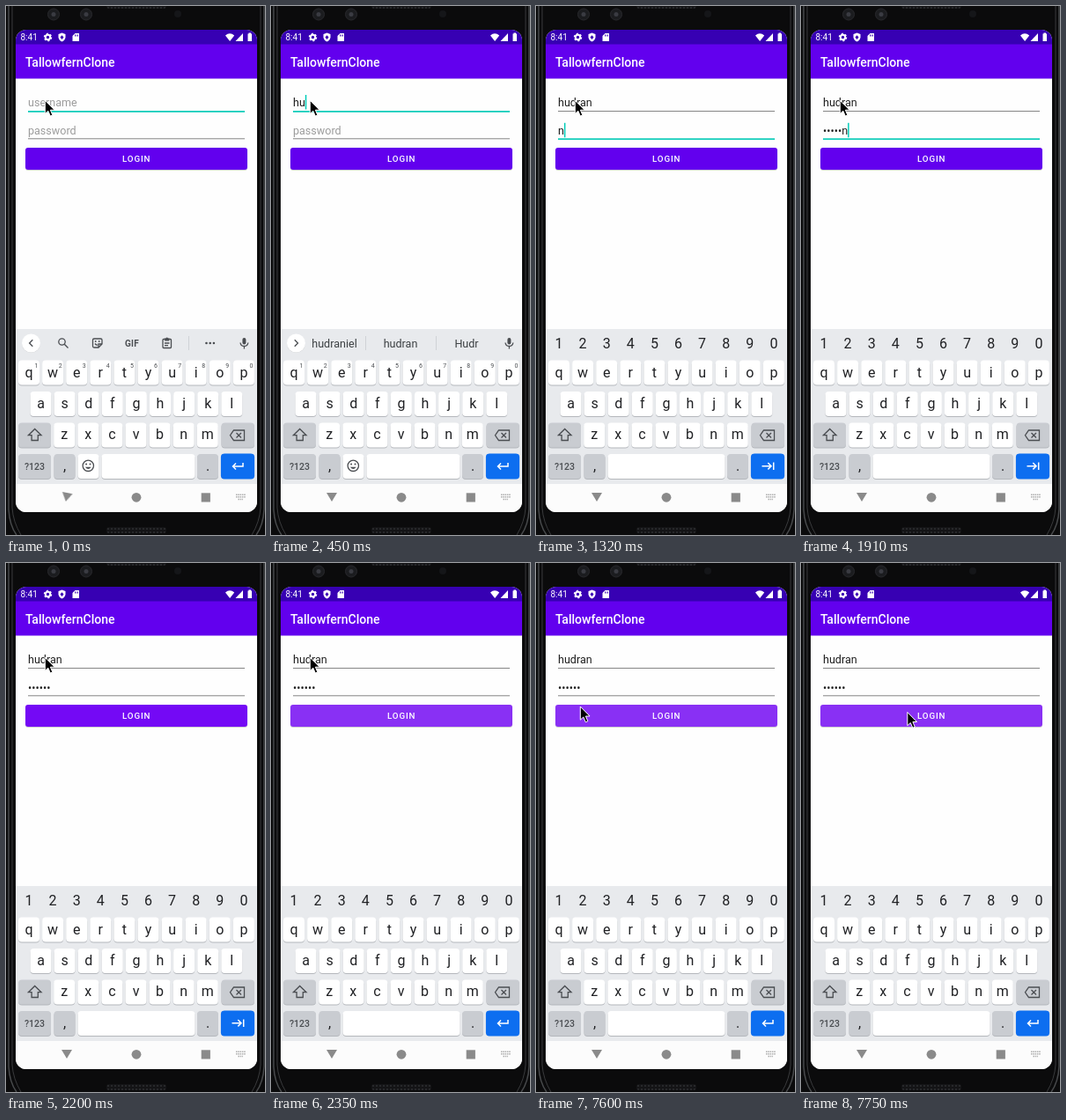
An HTML page that plays this animation: 294x601 px, repeating every 8 s.

```html
<!DOCTYPE html>
<html lang="en">
<head>
<meta charset="utf-8">
<title>Login screen</title>
<style>
html, body { margin: 0; width: 100%; height: 100%; overflow: hidden; background: #0b0b0c; }
svg { display: block; width: 294px; height: 601px; font-family: Roboto, Arial, sans-serif; }
text { white-space: pre; }
.field { font-size: 12.56px; }
.key { font-size: 16px; fill: #202124; text-anchor: middle; }
.hint { font-size: 7px; fill: #4a4d51; text-anchor: middle; }
.word { font-size: 12.56px; fill: #3c4043; text-anchor: middle; }
.mode { font-size: 10.5px; font-weight: 500; fill: #4a4d51; text-anchor: middle; }
.line { fill: none; stroke: #4a4d51; stroke-width: 1.3; }
.dark { fill: #4a4d51; }
.off { display: none; }
#back { transform-origin: 69px 557px; animation: settle 8s step-end infinite; }
@keyframes settle { 0% { transform: rotate(11deg); } 1.875%, 100% { transform: none; } }
</style>
</head>
<body>
<svg viewBox="0 0 294 601">
  <defs>
    <clipPath id="screen"><rect x="11" y="27" width="274" height="548" rx="12"/></clipPath>
    <pattern id="grill" x="114" y="592" width="4" height="4" patternUnits="userSpaceOnUse">
      <rect width="4" height="4" fill="#141416"/><circle cx="2" cy="2" r="1.1" fill="#2b2c2f"/>
    </pattern>
  </defs>

  <!-- phone body -->
  <rect width="294" height="601" fill="#0b0b0c"/>
  <g fill="none">
    <path d="M3 0V572Q4 590 12 601M293 0V572Q292 590 284 601" stroke="#47494b" stroke-width="1.500"/>
    <path d="M7 0V570Q8 586 17 601M289 0V570Q288 586 279 601" stroke="#3a3b3d"/>
  </g>
  <g fill="#1b1c1f" stroke="#29292d">
    <circle cx="54" cy="9.500" r="6.500"/><circle cx="91" cy="9.500" r="6.500"/>
  </g>
  <g fill="#3a3b42"><circle cx="54" cy="9.500" r="2.500"/><circle cx="91" cy="9.500" r="2.500"/></g>
  <circle cx="195" cy="9" r="4" fill="#151619"/>
  <rect x="114" y="-4" width="68" height="7" rx="3" fill="url(#grill)"/>
  <rect x="114" y="592" width="68" height="7" rx="3" fill="url(#grill)"/>

  <g clip-path="url(#screen)">
    <rect x="11" y="27" width="274" height="548" fill="#fefefe"/>
    <rect x="11" y="43" width="274" height="39.500" fill="#6200ee"/>
    <rect x="11" y="27" width="274" height="16.500" fill="#3700b3"/>

    <!-- status bar -->
    <g fill="#fff">
      <text x="16.500" y="39" font-size="10">8:41</text>
      <circle cx="47.500" cy="35.500" r="2.700" fill="none" stroke="#fff" stroke-width="2"/>
      <circle cx="47.500" cy="35.500" r="4" fill="none" stroke="#fff" stroke-width="1.500" stroke-dasharray="2.100 2.090"/>
      <path d="M63.500 30.500L67.500 32V35.500Q67 39 63.500 40.500Q60 39 59.500 35.500V32Z"/>
      <path d="M63.500 33.200L65.500 35.500L63.500 38L61.500 35.500Z" fill="#3700b3"/>
      <path d="M78.500 31H83V40H75.500V34Z"/>
      <path d="M78.500 32.500V34.500M80 32.500V34.500M81.500 32.500V34.500" stroke="#3700b3" stroke-width=".8"/>
      <path d="M249 33.500Q254 29.200 259.200 33.500L254.100 40Z"/>
      <path d="M269 31V40H260.500Z"/>
      <path d="M274.500 31.500H275.500V30.500H278V31.500H279V40H274.500Z"/>
    </g>
    <text x="22" y="69" font-size="14" font-weight="500" fill="#fff">TallowfernClone</text>

    <!-- form -->
    <text id="user" class="field" x="25" y="114.300"/>
    <rect id="userLine" x="25" width="246"/>
    <text id="pass" class="field" x="25" y="145.500"/>
    <rect id="passLine" x="25" width="246"/>
    <rect id="caret" width="1.500" height="16.500" fill="#03cdb9"/>
    <rect x="22" y="162" width="252" height="25" rx="3" fill="#000" opacity=".18"/>
    <rect id="button" x="22" y="161" width="252" height="25" rx="3"/>
    <text x="132" y="177.200" font-size="9.770" font-weight="500" letter-spacing=".87" fill="#fff">LOGIN</text>

    <!-- keyboard -->
    <rect x="11" y="367" width="274" height="176" fill="#e8eaed"/>
    <g id="strip">
      <circle cx="28.500" cy="383.500" r="10.500" fill="#000" opacity=".1"/>
      <circle cx="28.500" cy="383" r="10.500" fill="#fff"/>
      <path id="chevron" class="line"/>
      <rect x="268.400" y="377" width="4" height="7.500" rx="2" class="dark"/>
      <path class="line" d="M266 382.500Q266.500 386.500 270.400 386.500Q274.300 386.500 274.800 382.500M270.400 386.500V389.500"/>
    </g>
    <g id="tools">
      <circle class="line" cx="63.500" cy="381.500" r="3.700"/>
      <path class="line" d="M66.300 384.300L70.500 388.500"/>
      <path class="line" d="M100 378H107.500Q109 378 109 379.500V384L105 388H100Q98.500 388 98.500 386.500V379.500Q98.500 378 100 378ZM105 388V384H109M101 383.500Q102.500 385.500 104 385"/>
      <circle class="dark" cx="101.700" cy="381" r=".9"/><circle class="dark" cx="105.700" cy="381" r=".9"/>
      <text x="143" y="386.500" font-size="10" font-weight="700" letter-spacing=".3" text-anchor="middle" class="dark">GIF</text>
      <rect class="line" x="178" y="378.500" width="9.500" height="10" rx="1"/>
      <path class="dark" d="M180.200 377.500H181.500Q182.700 375.500 184 377.500H185.300V380.500H180.200Z"/>
      <path class="line" d="M180 383H185.500M180 385.700H184" stroke-width="1"/>
      <rect x="207" y="375" width="1" height="16" fill="#cfd2d6"/>
      <g class="dark"><circle cx="227.500" cy="383" r="1.300"/><circle cx="231.700" cy="383" r="1.300"/><circle cx="235.900" cy="383" r="1.300"/></g>
    </g>
    <g id="words">
      <rect x="107" y="375" width="1" height="16" fill="#cfd2d6"/>
      <rect x="187" y="375" width="1" height="16" fill="#cfd2d6"/>
      <text class="word" x="72" y="388"/><text class="word" x="147" y="388"/><text class="word" x="222" y="388"/>
    </g>
    <g id="digits"></g>
    <g id="keys"></g>
    <g id="hints"></g>
    <path class="line" d="M32.700 480.500L40 487.700H36.300V493.500H29.100V487.700H25.400Z"/>
    <path class="line" d="M258.500 482H270.500V493.500H258.500L254.500 487.750ZM261.500 485L267 490.500M267 485L261.500 490.500"/>
    <g id="emoji">
      <circle class="line" cx="93.300" cy="522.300" r="6.200"/>
      <circle class="dark" cx="91.100" cy="520.400" r="1"/><circle class="dark" cx="95.500" cy="520.400" r="1"/>
      <path class="dark" d="M89.900 523.700H96.700Q93.300 528.500 89.900 523.700Z"/>
    </g>
    <rect x="243.900" y="508.500" width="38.200" height="29" rx="4" fill="#0d6ef0"/>
    <path id="action" fill="none" stroke="#fff" stroke-width="1.500"/>

    <!-- navigation bar -->
    <rect x="11" y="543" width="274" height="32" fill="#fcfcfc"/>
    <g fill="#8a8a8a">
      <path id="back" d="M63 553H75L69 563Z"/>
      <circle cx="148" cy="558.300" r="5.400"/>
      <rect x="221.700" y="553.300" width="10.200" height="10.200"/>
      <path d="M261 555.300H271.700M261 557.800H271.700M263.500 560.500H269" stroke="#aaa" stroke-width="1.500" stroke-dasharray="1.500 .8"/>
    </g>
  </g>
  <path id="mouse" d="M0 0V15.200L3.500 12L6 17.800L8.500 16.700L6.100 11H10.800Z" fill="#000" stroke="#fff" stroke-width="1" stroke-linejoin="round"/>
</svg>
<script>
const $ = id => document.getElementById(id);
const NS = 'http://www.w3.org/2000/svg';
const LOOP = 8000, PITCH = 27.1;

function add(parent, tag, attrs, text = '') {
  const el = document.createElementNS(NS, tag);
  for (const k in attrs) el.setAttribute(k, attrs[k]);
  el.textContent = text;
  return $(parent).appendChild(el);
}

// A key cap with its shadow, as one group.
function key(x, y, w, fill = '#fff') {
  const cap = add('keys', 'g', {});
  const box = { x, width: w, height: 28, rx: 4 };
  cap.append(add('keys', 'rect', { ...box, y: y + 1, fill: '#b4b7bc' }),
    add('keys', 'rect', { ...box, y, fill }));
  return cap;
}

function label(parent, x, y, text, cls = 'key') {
  return add(parent, 'text', { x, y, class: cls }, text);
}

[['qwertyuiop', 26, 402.5, 421.5], ['asdfghjkl', 39.5, 438, 457], ['zxcvbnm', 66.2, 473.5, 492]]
  .forEach(([row, x0, y, base]) => [...row].forEach((c, i) => {
    const x = x0 + i * PITCH;
    key(x - 12, y, 24);
    label('keys', x, base, c);
  }));

[...'1234567890'].forEach((d, i) => {
  label('digits', 26 + i * PITCH, 389.2, d);
  label('hints', 34.5 + i * PITCH, 410.5, d, 'hint');
});

const GRAY = '#c9ccd1';
key(14, 473.5, 37, GRAY);
key(244.5, 473.5, 37.5, GRAY);
key(14, 509, 37, GRAY);
key(54.5, 509, 24, GRAY);
const emojiKey = key(81.5, 509, 24);
const space = key(108.5, 509, 106);
const wideSpace = key(81.5, 509, 133);
key(217, 509, 24, GRAY);
label('keys', 32.5, 526.7, '?123', 'mode');
label('keys', 66.5, 528, ',');
label('keys', 229, 528, '.');

const NAME = 'hudran';
const FIRST = [NAME + 'iel', NAME, 'Hudr'], NEXT = ['hud', NAME, 'Hud'];
const base = { user: '', pass: '', focus: 'user', caret: true, bar: 'tools', words: FIRST,
  enter: true, button: '#6200ee', mouse: [44.3, 107.2] };

// Each step keeps what the earlier ones set.
const steps = [
  [0, { caret: false }],
  [150, { user: NAME.slice(0, 1), caret: true }],
  [300, { user: NAME.slice(0, 2) }],
  [450, { bar: 'words' }],
  [590, { user: NAME.slice(0, 4) }],
  [730, { user: NAME, words: NEXT }],
  [880, { focus: 'pass' }],
  [1030, { bar: 'digits', enter: false }],
  [1320, { pass: 'n' }],
  [1470, { pass: '•a' }],
  [1760, { pass: '••••a' }],
  [1910, { pass: '•••••n' }],
  [2200, { pass: '••••••', focus: '', caret: false, button: '#7409f5' }],
  [2350, { enter: true, button: '#8930f4' }],
  [7450, { mouse: [41.3, 151.7] }],
  [7600, { mouse: [50.3, 163] }],
  [7750, { mouse: [120.8, 169.5] }]
];
let last = base;
const states = steps.map(([at, change]) => (last = { ...last, ...change, at }));

const show = (el, on) => el.classList.toggle('off', !on);

function field(id, value, hint, y, focused) {
  const el = $(id), line = $(id + 'Line');
  el.textContent = value || hint;
  el.setAttribute('fill', value ? '#202020' : '#9c9c9c');
  line.setAttribute('y', y);
  line.setAttribute('height', focused ? 1.8 : 1);
  line.setAttribute('fill', focused ? '#12cdbb' : '#858585');
}

function draw(s) {
  field('user', s.user, 'username', 119, s.focus === 'user');
  field('pass', s.pass, 'password', 150.3, s.focus === 'pass');

  show($('caret'), s.caret);
  if (s.caret) {
    const width = s[s.focus] ? $(s.focus).getComputedTextLength() : 0;
    $('caret').setAttribute('x', 25 + width);
    $('caret').setAttribute('y', s.focus === 'user' ? 101 : 132.8);
  }

  const digits = s.bar === 'digits';
  for (const id of ['tools', 'words', 'digits']) show($(id), s.bar === id);
  for (const el of [$('strip'), $('hints'), $('emoji'), emojiKey, space]) show(el, !digits);
  show(wideSpace, digits);
  $('words').querySelectorAll('text').forEach((t, i) => { t.textContent = s.words[i]; });
  $('chevron').setAttribute('d', s.bar === 'tools'
    ? 'M30.3 379.3L26.6 383L30.3 386.7' : 'M26.8 379.3L30.5 383L26.8 386.7');
  $('action').setAttribute('d', s.enter
    ? 'M269 519V523H257.5M261 519.5L257.5 523L261 526.5'
    : 'M256.5 522.7H267M263.3 519L267 522.7L263.3 526.4M269.7 518.5V527');
  $('button').setAttribute('fill', s.button);
  $('mouse').setAttribute('transform', `translate(${s.mouse})`);
}

let shown;
function tick() {
  const t = performance.now() % LOOP;
  const s = states.findLast(s => s.at <= t);
  if (s !== shown) draw(shown = s);
  // keep the stylesheet animation on the same clock
  for (const a of $('back').getAnimations()) a.currentTime = t;
  requestAnimationFrame(tick);
}
tick();
</script>
</body>
</html>
```
